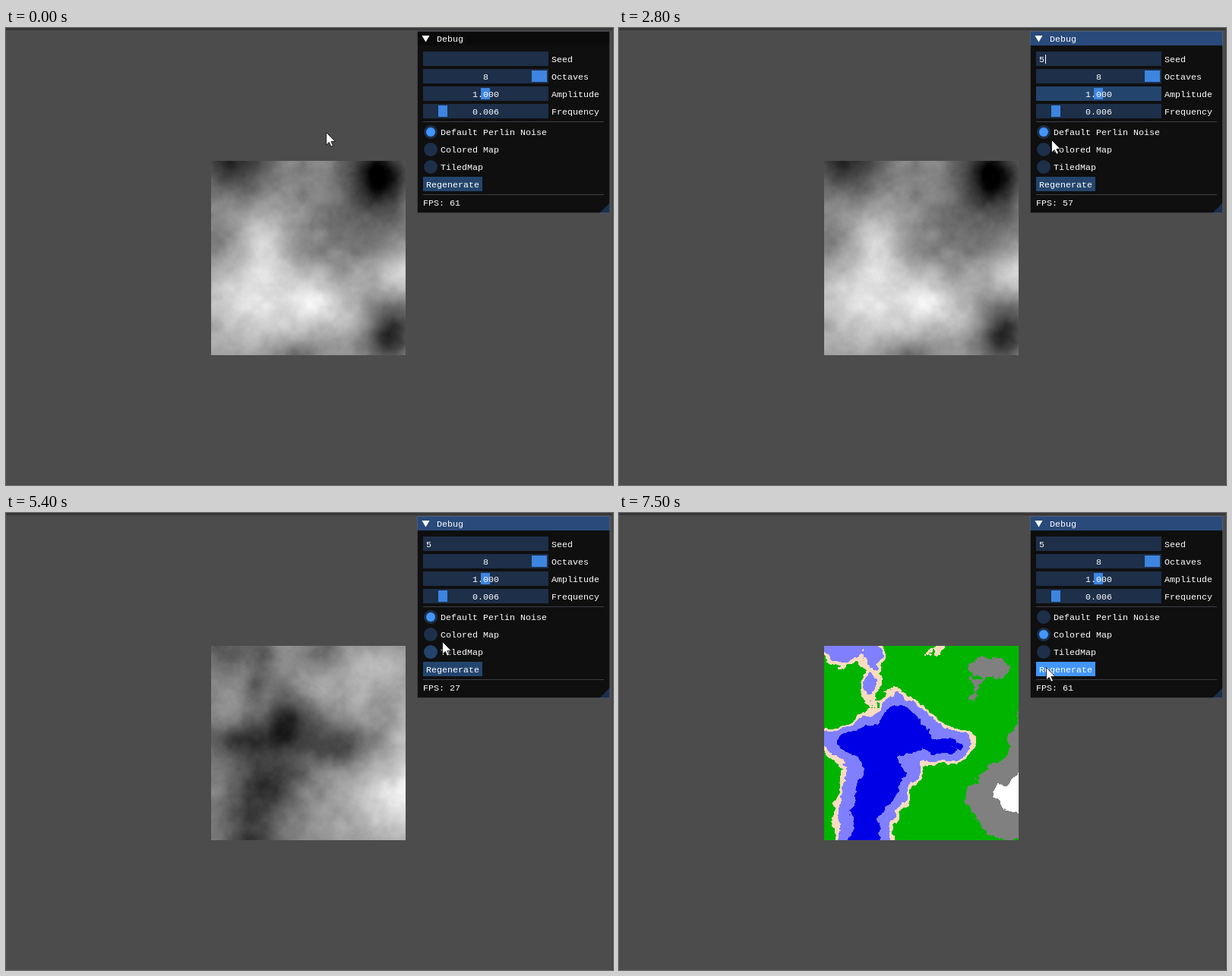
Recreate the animation shown at these times as an HTML page with a canvas. Size 799 by 602 pixels, loop 8 s.

```html
<!DOCTYPE html>
<html lang="en">
<head>
<meta charset="utf-8">
<title>Noise debug panel</title>
<style>
  html, body { margin: 0; width: 100%; height: 100%; overflow: hidden; background: #4c4c4c; }
  canvas { position: absolute; left: 270px; top: 175px; }
  svg { position: absolute; left: 0; top: 0; }
  text { font: 11.667px "Liberation Mono", "DejaVu Sans Mono", monospace; fill: #fff; white-space: pre; }
  rect { shape-rendering: crispEdges; }
</style>
</head>
<body>
<canvas id="first" width="256" height="256"></canvas>
<canvas id="second" width="256" height="256"></canvas>
<canvas id="map" width="256" height="256"></canvas>
<svg id="ui" width="799" height="602" viewBox="0 0 799 602"></svg>
<script>
const LOOP = 8000, STEP = 100, SIZE = 256;
const $ = id => document.getElementById(id);
const mix = (a, b, t) => a + (b - a) * t;

// ---- noise pictures ----
const hash = (x, y, seed) => {
  let h = Math.imul(x, 374761393) ^ Math.imul(y, 668265263) ^ Math.imul(seed, 974634777);
  h = Math.imul(h ^ (h >>> 13), 1274126177);
  h = Math.imul(h ^ (h >>> 15), 2246822519);
  return ((h ^ (h >>> 16)) >>> 0) / 2147483648 - 1;
};
const fade = t => t * t * (3 - 2 * t);

function valueNoise(x, y, seed) {
  const ix = Math.floor(x), iy = Math.floor(y), u = fade(x - ix), v = fade(y - iy);
  return mix(mix(hash(ix, iy, seed), hash(ix + 1, iy, seed), u),
             mix(hash(ix, iy + 1, seed), hash(ix + 1, iy + 1, seed), u), v);
}
function fbm(x, y, seed) {
  let sum = 0;
  for (let i = 0, cell = 24, amp = 12; i < 5; i++, cell /= 2, amp *= 0.55) {
    sum += amp * valueNoise(x / cell, y / cell, seed + i);
  }
  return sum;
}

// Soft hills and hollows: x, y, x radius, y radius, height.
const cloudHills = [
  [25, 3, 52, 45, -105], [220, 18, 43, 46, -150], [115, 22, 45, 30, -18],
  [70, 100, 28, 45, 55], [185, 90, 60, 40, -45], [8, 105, 25, 25, -30],
  [245, 145, 35, 30, 65], [60, 175, 75, 45, 75], [140, 188, 35, 30, 70],
  [65, 225, 70, 25, 25], [188, 210, 25, 25, 35], [236, 228, 32, 35, -115], [115, 256, 25, 18, -45]
];
const landHills = [
  [100, 98, 38, 38, -100], [42, 125, 48, 23, -68], [165, 132, 46, 28, -74], [72, 180, 48, 45, -90],
  [50, 240, 40, 35, -65], [55, 262, 40, 15, -30], [25, 0, 35, 28, -55], [65, 15, 18, 25, -32],
  [57, 55, 12, 20, -35], [147, 5, 18, 18, -42],
  [256, 200, 85, 55, 88], [256, 120, 20, 60, 40], [218, 30, 40, 30, 45], [150, 55, 35, 35, 28],
  [205, 70, 40, 30, 16]
];
const height = (hills, base, seed) => (x, y) => hills.reduce(
  (sum, [cx, cy, rx, ry, h]) => sum + h * Math.exp(-(((x - cx) / rx) ** 2) - ((y - cy) / ry) ** 2),
  base + fbm(x, y, seed));

const gray = v => [v, v, v];
const terrain = v =>
  v < 75 ? [0, 0, 230] :
  v < 101 ? [128, 128, 255] :
  v < 110 ? [250, 220, 190] :
  v < 178 ? [0, 180, 0] :
  v < 222 ? [128, 128, 128] : [255, 255, 255];

function paint(id, field, color) {
  const ctx = $(id).getContext('2d'), img = ctx.createImageData(SIZE, SIZE);
  for (let i = 0; i < SIZE * SIZE; i++) {
    img.data.set([...color(field(i % SIZE, i >> 8)), 255], i * 4);
  }
  ctx.putImageData(img, 0, 0);
}
const land = height(landHills, 140, 17);
paint('first', height(cloudHills, 150, 3), gray);
paint('second', land, gray);
paint('map', land, terrain);

// ---- panel ----
const LEFT = 549, ROW = 23, ITEM = 19;
const FRAME = '#1d2f49', HOVER = '#23456d', PRESS = '#3169a9', GRAB = '#3d85e0', ACCENT = '#4296fa';
const sliders = ['Seed', 'Octaves', 'Amplitude', 'Frequency'];
const radios = ['Default Perlin Noise', 'Colored Map', 'TiledMap'];
const items = [
  ...sliders.map((name, i) => ({ name, top: 31 + ROW * i })),
  ...radios.map((name, i) => ({ name, top: 128 + ROW * i })),
  { name: 'Regenerate', top: 196 }
];
const topOf = name => items.find(item => item.name === name).top;

const rect = (x, y, w, h, fill, id = '') => `<rect id="${id}" x="${x}" y="${y}" width="${w}" height="${h}" fill="${fill}"/>`;
const text = (x, y, s, id = '') => `<text id="${id}" x="${x}" y="${y}">${s}</text>`;
const line = y => rect(LEFT, y, 238, 1, '#3e3e48');

const slider = (name, value = '', gx = 0, gw = 0) => {
  const y = topOf(name);
  return rect(LEFT, y, 165, ITEM, FRAME, name) + rect(gx, y + 2, gw, 15, GRAB) +
    text(631.5 - value.length * 3.5, y + 14, value) + text(718, y + 14, name);
};
const radio = name => {
  const y = topOf(name) + 9;
  return `<circle id="${name}" cx="559" cy="${y}" r="9"/>` +
    `<circle id="${name} dot" cx="559" cy="${y}" r="6" fill="${ACCENT}"/>` + text(572, y + 4, name);
};

$('ui').innerHTML =
  rect(0, 0, 799, 3, '#383838') + rect(798, 0, 1, 602, '#404040') +
  rect(541, 4, 254, 240, '#0f0f0f') + rect(541, 4, 254, 19, '#0a0a0a', 'title') +
  '<path d="M795 230V244H781Z" fill="#1a2f4d"/>' +
  '<path d="M541.5 4.5H794.5V243.5H541.5Z" fill="none" stroke="#6e6e80" stroke-opacity=".5"/>' +
  '<path d="M547.5 10H557.5L552.5 18.5Z" fill="#fff"/>' + text(567, 18, 'Debug') +
  slider('Seed') + slider('Octaves', '8', 692, 20) +
  slider('Amplitude', '1.000', 625, 12) + slider('Frequency', '0.006', 569, 12) +
  text(553, 45, '5', 'typed') + rect(561, 35, 1, 12, '#fff', 'caret') +
  line(123) + radios.map(radio).join('') +
  rect(LEFT, 196, 78, ITEM, HOVER, 'Regenerate') + text(553, 210, 'Regenerate') +
  line(219) + text(LEFT, 234, '', 'fps') +
  '<g id="pointer"><path id="arrow" d="M.5 .5V17L4.3 13.4 6.8 19.2 9.4 18.1 6.9 12.4H12.2Z" fill="#fff" stroke="#000" stroke-width=".8"/>' +
  '<path id="beam" d="M-2.5 -7.5H-.5M1.5 -7.5H3.5M.5 -7V7M-2.5 7.5H-.5M1.5 7.5H3.5" stroke="#fff" fill="none"/></g>';

// ---- timeline ----
// Pointer moves: start, end, x, y.
const moves = [
  [0, 0, 421, 137], [300, 1200, 499, 66], [1200, 1600, 553, 41], [1700, 1900, 558, 41],
  [2700, 2800, 569, 147], [2900, 3200, 580, 197], [3400, 3500, 580, 198],
  [5200, 5400, 574, 169], [5400, 5700, 563, 142], [5700, 6200, 555, 157], [6500, 7100, 562, 203]
];
const fpsSteps = [[0, 61], [2800, 57], [4100, 52], [4300, 47], [5000, 27], [5600, 44], [6000, 60], [6700, 61]];
const TYPE = 2100, BLUR = 4000;
const clicks = { generate: [4000, 4400], colored: [6200, 6400], recolor: [7300, 7500] };

function pointerAt(t) {
  let x = 0, y = 0;
  for (const [t0, t1, nx, ny] of moves) {
    if (t < t0) break;
    const p = t < t1 ? (t - t0) / (t1 - t0) : 1;
    x = mix(x, nx, p);
    y = mix(y, ny, p);
  }
  return [Math.round(x), Math.round(y)];
}
const itemAt = ([x, y]) => x < LEFT ? '' : (items.find(i => y >= i.top && y < i.top + ITEM) || { name: '' }).name;
const during = (t, [a, b]) => t >= a && t < b;
const show = (id, on) => { $(id).style.visibility = on ? 'visible' : 'hidden'; };
const fill = (id, color) => $(id).setAttribute('fill', color);

function render(t) {
  const spot = pointerAt(t), beam = itemAt(spot) === 'Seed';
  const over = itemAt(pointerAt(t - 60));   // the panel reacts a little late
  const held = Object.values(clicks).some(c => during(t, c));
  const picture = t >= clicks.recolor[1] ? 'map' : t >= clicks.generate[1] ? 'second' : 'first';
  const checked = radios[t >= clicks.colored[1] ? 1 : 0];

  ['first', 'second', 'map'].forEach(id => show(id, id === picture));
  fill('title', t >= TYPE ? '#294a7a' : '#0a0a0a');
  show('typed', t >= TYPE);
  show('caret', during(t, [TYPE, BLUR]));
  sliders.slice(1).forEach(name => fill(name, over === name ? HOVER : FRAME));
  radios.forEach(name => {
    fill(name, over !== name ? FRAME : held ? PRESS : HOVER);
    show(name + ' dot', name === checked);
  });
  fill('Regenerate', over !== 'Regenerate' ? HOVER : held ? '#0f87fa' : ACCENT);
  $('fps').textContent = 'FPS: ' + fpsSteps.filter(s => s[0] <= t).pop()[1];
  show('arrow', !beam);
  show('beam', beam);
  $('pointer').setAttribute('transform', `translate(${spot})`);
}

let last = -1;
const start = performance.now();
function tick() {
  const t = Math.floor((performance.now() - start) % LOOP / STEP) * STEP;
  if (t !== last) render(last = t);
  requestAnimationFrame(tick);
}
tick();
</script>
</body>
</html>
```
